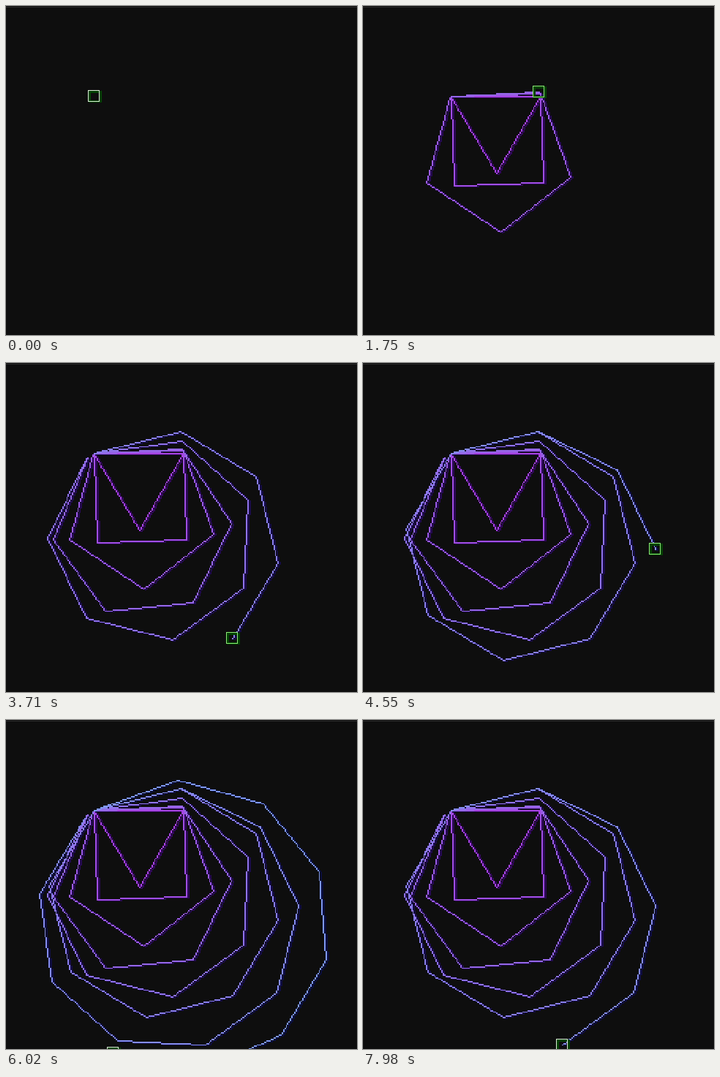
An HTML page with a canvas that plays this animation: 480 by 450 pixels, repeating every 8000 ms.

```html
<!DOCTYPE html>
<html lang="en">
<head>
<meta charset="utf-8">
<title>Turtle polygons</title>
<style>
  html, body { margin: 0; width: 100%; height: 100%; overflow: hidden; background: #0e0e0e; }
  canvas { display: block; }
</style>
</head>
<body>
<canvas id="stage" width="480" height="450"></canvas>
<script>
const ctx = document.getElementById('stage').getContext('2d');
const LOOP = 8000, FRAME = 70, EDGE_TIME = 120;
const SCALE = 1.875, SIDE = 64.55, HOME = { x: 64, y: 65 };
const LAST_EDGE = 51, LAST_POLYGON_START = 42;

const mix = (a, b, k) => `rgb(${a.map((v, i) => Math.round(v + (b[i] - v) * k))})`;

// Every polygon starts at home. A full turn is 256 units, so whole-number
// turns leave a remainder and the heading drifts from polygon to polygon.
function buildEdges() {
  const edges = [];
  let heading = 0;
  for (let sides = 3; sides <= 10; sides++) {
    const k = (sides - 3) / 7;
    const color = mix([166, 66, 226], [126, 152, 240], k);
    const shadow = mix([48, 8, 88], [10, 14, 62], k);
    let from = HOME;
    for (let i = 0; i < sides; i++) {
      const angle = heading * Math.PI / 128;
      const to = {
        x: from.x + Math.round(SIDE * Math.cos(angle)),
        y: from.y + Math.round(SIDE * Math.sin(angle))
      };
      edges.push({ from, to, color, shadow });
      from = to;
      heading += Math.floor(256 / sides);
    }
  }
  return edges;
}
const edges = buildEdges();

// Number of visible edges and pen position; after the last edge they are undone.
function stateAt(time) {
  const step = Math.max(0, Math.floor((time - 1) / EDGE_TIME) - 1);
  let count = step;
  if (step > LAST_EDGE) {
    count = 2 * LAST_EDGE - step;
    if (count === LAST_POLYGON_START) return { count, pen: HOME };
    if (count < LAST_POLYGON_START) count++;
  }
  return { count, pen: count ? edges[count - 1].to : HOME };
}

const px = u => Math.round(u * SCALE);
const py = v => Math.round(v * SCALE + 1);

function pixelLine({ from, to }, color, shiftX, shiftY, extra) {
  const dx = to.x - from.x, dy = to.y - from.y;
  const n = Math.max(Math.abs(dx), Math.abs(dy));
  ctx.fillStyle = color;
  for (let i = 0; i <= n; i++) {
    const u = Math.round(from.x + dx * i / n), v = Math.round(from.y + dy * i / n);
    const x = px(u), y = py(v);
    ctx.fillRect(x + shiftX, y + shiftY, px(u + 1) - x + extra, py(v + 1) - y);
  }
}

function drawPen(pen, frame) {
  const x = Math.round(pen.x * SCALE - 8) + 0.5;
  const y = Math.round(pen.y * SCALE + 1 - 7.9) + 0.5;
  ctx.strokeStyle = '#004200';
  ctx.lineWidth = 3;
  ctx.strokeRect(x + 2, y + 2, 15, 13);
  ctx.strokeStyle = frame % 2 ? '#8ee878' : '#dcead8';
  ctx.lineWidth = 1;
  ctx.strokeRect(x, y, 15, 15);
}

function draw(now) {
  const frame = Math.floor((now % LOOP) / FRAME);
  const { count, pen } = stateAt(frame * FRAME);
  const visible = edges.slice(0, count);
  ctx.fillStyle = '#0e0e0e';
  ctx.fillRect(0, 0, 480, 450);
  ctx.fillStyle = '#2c2c2c';
  ctx.fillRect(0, 1, 480, 1);
  visible.forEach(e => pixelLine(e, e.shadow, 2, 1, 1));
  visible.forEach(e => pixelLine(e, e.color, 0, 0, 0));
  drawPen(pen, frame);
}

const start = performance.now();
function tick() {
  draw(performance.now() - start);
  requestAnimationFrame(tick);
}
tick();
</script>
</body>
</html>
```
